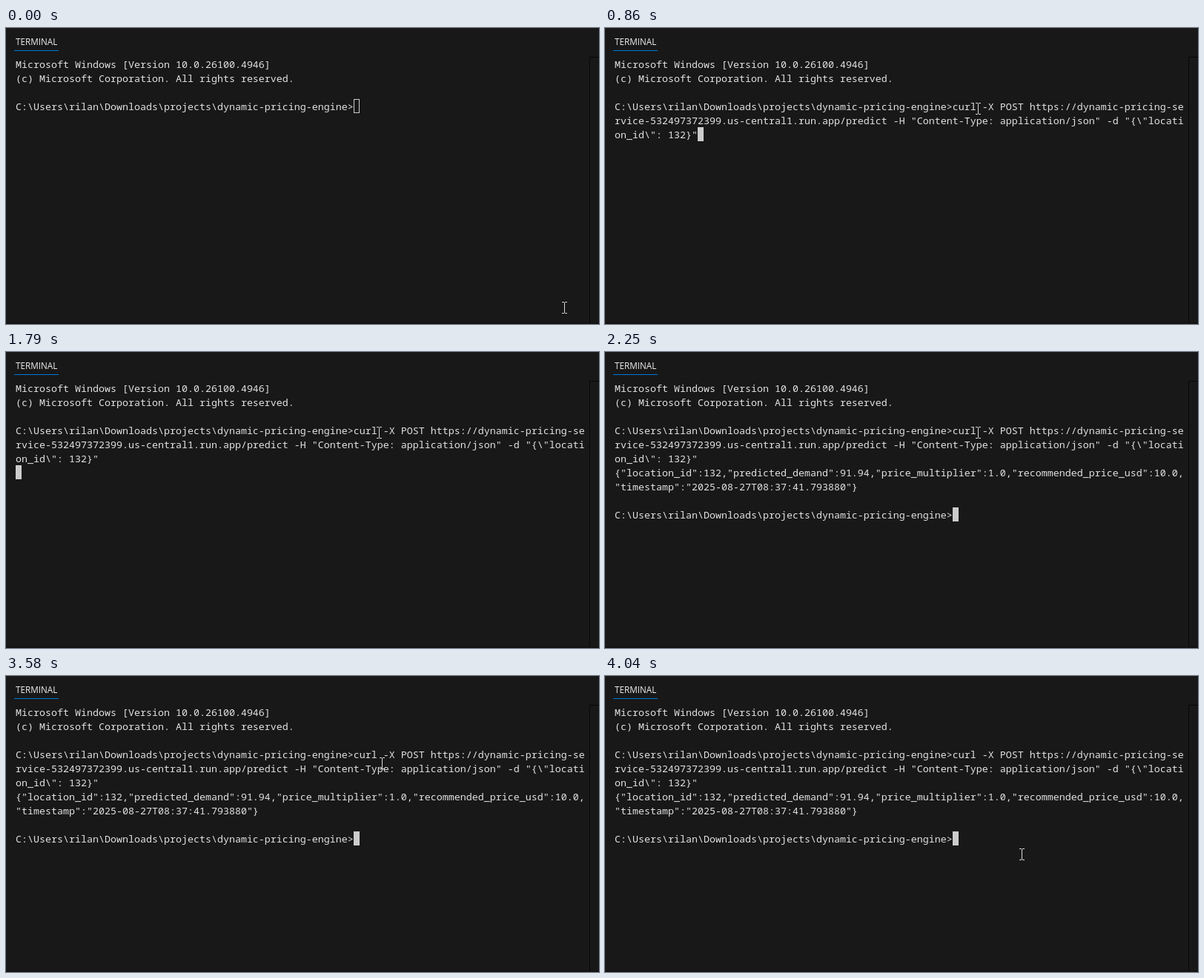
Write an HTML page with a canvas that moves like this. It is 800 by 400 pixels and loops after 4310 ms.

```html
<!DOCTYPE html>
<html lang="en">
<head>
<meta charset="utf-8">
<title>Terminal</title>
<style>
  html, body { margin: 0; width: 100%; height: 100%; overflow: hidden; background: #181818; }
  canvas { display: block; width: 800px; height: 400px; }
</style>
</head>
<body>
<canvas id="stage" width="800" height="400"></canvas>
<script>
const ctx = document.getElementById('stage').getContext('2d');
const LOOP = 4310;
const COLS = 96, CELL = 8, ROW = 19, LEFT = 13, TOP = 39;
const INK = '#e2e2e2', CARET = '#cccccc';

const prompt = 'C:\\Users\\rilan\\Downloads\\projects\\dynamic-pricing-engine>';
const intro = 'Microsoft Windows [Version 10.0.26100.4946]\n' +
  '(c) Microsoft Corporation. All rights reserved.\n\n' + prompt;
const command = 'curl -X POST https://dynamic-pricing-service-532497372399.us-central1.run.app/predict' +
  ' -H "Content-Type: application/json" -d "{\\"location_id\\": 132}"';
const reply = '{"location_id":132,"predicted_demand":91.94,"price_multiplier":1.0,' +
  '"recommended_price_usd":10.0,"timestamp":"2025-08-27T08:37:41.793880"}';

// Output appended to the terminal at each time
const output = [
  [0, intro],
  [860, command],
  [1790, '\n'],
  [2180, reply + '\n'],
  [2250, '\n' + prompt]
];

const FOCUS = 130;
const REST = [503, 109], END = [562, 241];
const MOVE = { start: 3580, end: 4040, steps: 8 };

function box(color, x, y, w, h) {
  ctx.fillStyle = color;
  ctx.fillRect(x, y, w, h);
}

function wrap(text) {
  return text.split('\n').flatMap(line => line.match(new RegExp(`.{1,${COLS}}`, 'g')) || ['']);
}

function pointer(t) {
  if (t < 70) return [753, 378];
  if (t < FOCUS) return [560, 170];
  if (t < MOVE.start) return REST;
  const last = MOVE.steps - 1;
  const step = Math.min(last, Math.floor((t - MOVE.start) / (MOVE.end - MOVE.start) * last + 1e-6));
  const u = 0.16 + 0.84 * step / last;
  const eased = u * u * (3 - 2 * u);
  return REST.map((from, i) => Math.round(from + (END[i] - from) * eased));
}

function drawPanel() {
  box('#181818', 0, 0, 800, 400);
  ctx.font = '11.7px "Open Sans", "Noto Sans", sans-serif';
  ctx.fillStyle = '#f0f0f0';
  ctx.fillText('TERMINAL', LEFT, 23);
  box('#0078d4', 11, 30, 60, 1);
  box('#070707', 787, 39, 13, 1);
  box('#070707', 787, 39, 1, 361);
  box('#121212', 0, 398, 800, 2);
}

function drawTerminal(t) {
  const text = output.filter(([at]) => t >= at).map(([, part]) => part).join('');
  const lines = wrap(text);
  ctx.font = '500 13.3333px "Noto Sans Mono", "DejaVu Sans Mono", monospace';
  ctx.fillStyle = INK;
  lines.forEach((line, i) => ctx.fillText(line, LEFT, TOP + 15 + i * ROW));

  const row = lines.length - 1;
  const x = LEFT + lines[row].length * CELL, y = TOP + row * ROW;
  if (t >= FOCUS) {
    box(CARET, x, y, CELL, ROW);
  } else {
    ctx.strokeStyle = CARET;
    ctx.lineWidth = 1;
    ctx.strokeRect(x + 0.5, y + 0.5, CELL - 1, ROW - 1);
  }
}

function drawPointer(t) {
  const [x, y] = pointer(t);
  for (const edge of [y - 8, y + 7]) {
    box('#d8d8d8', x - 3, edge, 3, 1);
    box('#d8d8d8', x + 1, edge, 3, 1);
  }
  box('#d8d8d8', x, y - 7, 1, 14);
}

function frame() {
  const t = performance.now() % LOOP;
  drawPanel();
  drawTerminal(t);
  drawPointer(t);
  requestAnimationFrame(frame);
}
frame();
</script>
</body>
</html>
```
